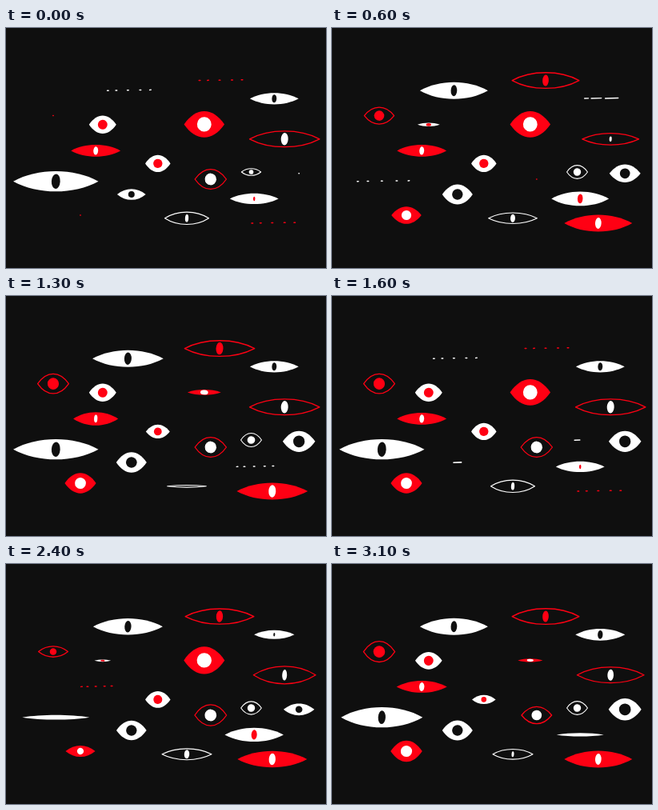
Animation of 400x300 px, one loop 3.2 s. Source, as an HTML page with a canvas:

```html
<!DOCTYPE html>
<html lang="en">
<head>
<meta charset="utf-8">
<title>Blinking eyes</title>
<style>
  html, body { margin: 0; width: 100%; height: 100%; overflow: hidden; background: #0f0f0f; }
  canvas { display: block; }
</style>
</head>
<body>
<canvas id="stage" width="400" height="300"></canvas>
<script>
const ctx = document.getElementById('stage').getContext('2d');
const DARK = '#0f0f0f', RED = '#ff0013', WHITE = '#fff';
const LOOP = 3200, STEP = 100;

// x, y, scale, blink start in steps, lid colour, pupil colour, outline width (0 = filled)
const slitEyes = [
  [152.4, 78.2, 1, 0, WHITE, DARK, 0],
  [267, 65.6, 1, 0, RED, RED, 1.3],
  [332.8, 244, 1, 0, RED, WHITE, 0],
  [335.3, 88.3, .7, 5, WHITE, DARK, 0],
  [348.2, 138.8, 1, 3, RED, WHITE, 1.3],
  [62.3, 191.7, 1.2, 6, WHITE, DARK, 0],
  [310.2, 213.4, .845, 13, WHITE, RED, 0],
  [226, 237.8, .71, 11, WHITE, WHITE, 1.1],
  [112.2, 153.4, .71, 8, RED, WHITE, 0],
];
const roundEyes = [
  [120.8, 120.8, 34, 2, WHITE, RED, 0],
  [247.8, 120.4, 51, 9, RED, WHITE, 0],
  [189.8, 169.4, 31.5, 7, WHITE, RED, 0],
  [255.8, 189, 41, 6, RED, WHITE, 1.3],
  [59, 109.6, 40.5, 0, RED, RED, 1.3],
  [93, 234, 39.5, 0, RED, WHITE, 0],
  [156.8, 208, 38, 14, WHITE, DARK, 0],
  [306.5, 180, 27, 14, WHITE, WHITE, 1.1],
  [366.2, 181.8, 41, 0, WHITE, DARK, 0],
];

// Poses are [lid width, lid height, pupil width, pupil height];
// the last three repeat as a hand-drawn wobble.
const slit = {
  period: 16, bend: .21,
  opening: { 2: [70, 4.8, 0, 0], 3: [72, 15.8, 3, 6.5], 4: [72, 19.5, 4.2, 10], 5: [79, 23.3, 6, 13.5] },
  wobble: [[85, 21, 7.7, 14], [88.7, 21, 9, 15.5], [87, 20.5, 8.3, 14.5]],
};
const round = {
  period: 19, bend: .2,
  opening: {
    3: [.61, .08, .16, .06], 4: [.82, .13, .19, .11],
    5: [.94, .36, .21, .21], 6: [.95, .55, .31, .31],
  },
  wobble: [[1, .67, .36, .36], [.99, .64, .35, .36], [1, .66, .35, .355]],
};

const mod = (a, n) => ((a % n) + n) % n;

function dash(x1, x2, y, color, width = 1.6) {
  ctx.strokeStyle = color;
  ctx.lineWidth = width;
  ctx.beginPath();
  ctx.moveTo(x1, y);
  ctx.lineTo(x2, y - (x2 - x1) * .03);
  ctx.stroke();
}

function drawLids(w, h, bend, color, outline) {
  const x = (w - outline) / 2, c = w * bend, y = (h - outline) * 2 / 3;
  ctx.beginPath();
  ctx.moveTo(-x, 0);
  ctx.bezierCurveTo(-c, -y, c, -y, x, 0);
  ctx.bezierCurveTo(c, y, -c, y, -x, 0);
  ctx.closePath();
  ctx.fillStyle = ctx.strokeStyle = color;
  ctx.lineWidth = outline;
  outline ? ctx.stroke() : ctx.fill();
}

function drawPose(type, step, size, lid, pupil, outline) {
  const pose = type.opening[step] || type.wobble[step % 3];
  const [w, h, pw, ph] = pose.map(v => v * size);
  drawLids(w, h, type.bend, lid, outline);
  ctx.fillStyle = pupil;
  ctx.beginPath();
  ctx.ellipse(0, 0, pw / 2, ph / 2, .05, 0, 2 * Math.PI);
  ctx.fill();
}

function drawSlit(step, size, lid, pupil, outline) {
  if (step === 0) {
    for (const x of [-25, -14.5, 0, 15.5, 28]) dash(x * size - .8, x * size + .8, -.4 - x * .015, lid, 1.5);
  } else if (step === 1) {
    for (const [a, b] of [[-28, -21], [-16, 2], [9, 32]]) dash(a * size, b * size, -.3, lid, 1.4);
  } else drawPose(slit, step, size, lid, pupil, outline);
}

function drawRound(step, size, lid, pupil, outline) {
  if (step === 0) dash(-.2, .2, 0, lid, 1.5);
  else if (step < 3) {
    const half = size * (step === 1 ? .07 : .14) - .5;
    dash(-half, half, .2, lid);
  } else drawPose(round, step, size, lid, pupil, outline);
}

function drawEyes(eyes, type, draw, now) {
  for (const [x, y, size, start, ...look] of eyes) {
    ctx.save();
    ctx.translate(x, y);
    draw(mod(now - start, type.period), size, ...look);
    ctx.restore();
  }
}

function render() {
  const now = Math.floor((performance.now() % LOOP) / STEP);
  ctx.fillStyle = DARK;
  ctx.fillRect(0, 0, 400, 300);
  ctx.lineCap = ctx.lineJoin = 'round';
  drawEyes(slitEyes, slit, drawSlit, now);
  drawEyes(roundEyes, round, drawRound, now);
  requestAnimationFrame(render);
}
render();
</script>
</body>
</html>
```
